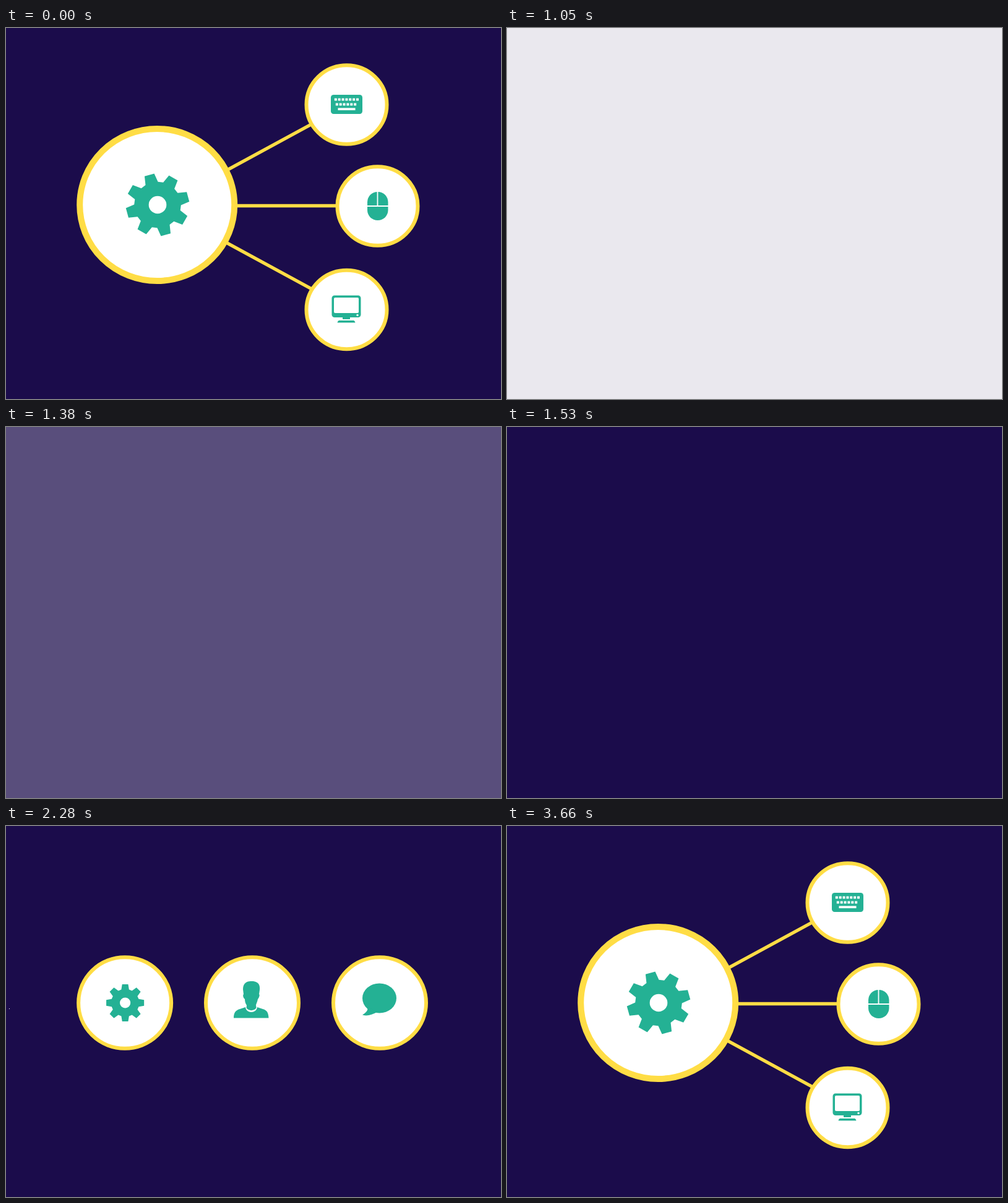
An HTML page for the animation above (3690 ms loop, 800x600 px).

```html
<!DOCTYPE html>
<html lang="en">
<head>
<meta charset="utf-8">
<title>Device menu</title>
<style>
  html, body { margin: 0; width: 100%; height: 100%; overflow: hidden; background: #1b0c4b; }
  svg { display: block; width: 100%; height: 100%; }
  .disc { fill: #fff; stroke: #ffdd45; }
  .icon { fill: #24b194; }
  .cut { fill: #fff; }
  .links line { stroke: #ffdd45; stroke-width: 5.4; }
</style>
</head>
<body>
<svg viewBox="0 0 800 600">
  <g id="trio">
    <rect x="5" y="295" width="1" height="1" fill="#fff"/>
    <g>
      <ellipse class="disc" cx="398" cy="286" rx="75" ry="73.8" stroke-width="6"/>
      <g class="icon">
        <path d="M383 264C383 254 389 251 397 251C406 251 411 255 410 265L409 272C411 274 408 279 407 280C406 285 404 288 404 290L404.5 294C402 299.500 391 299.500 388.500 294L389 290C387 287 386 284 386 280C384 279 382 274 384 272Z"/>
        <path d="M368 310.500C368 302 371 298 378 296L387 293C388 303.500 405 303.500 406 293L415 296C422 298 424 302 424.500 310.500Z"/>
      </g>
    </g>
    <g>
      <ellipse class="disc" cx="604" cy="286" rx="75" ry="73.8" stroke-width="6"/>
      <g class="icon">
        <ellipse cx="603.5" cy="278.500" rx="27.500" ry="24"/>
        <path d="M584 292C586 299 581 302 576 305.500C584 308 592 305 600 301Z"/>
      </g>
    </g>
  </g>

  <g class="links">
    <line x1="330" y1="244.700" x2="550" y2="125"/>
    <line x1="330" y1="287.500" x2="600" y2="287.500"/>
    <line x1="330" y1="332.800" x2="550" y2="452.500"/>
  </g>

  <g id="hub">
    <ellipse class="disc" cx="244.2" cy="286" rx="125" ry="123" stroke-width="10"/>
    <g transform="translate(245 286) scale(1.01 .995)">
      <path id="gear" class="icon"/>
      <circle class="cut" r="14.200"/>
    </g>
  </g>

  <g class="sat">
    <ellipse class="disc" cx="550.5" cy="124" rx="65" ry="63.700" stroke-width="6"/>
    <rect class="icon" x="525" y="108" width="51" height="31" rx="4.500"/>
    <g id="keys" class="cut"><rect x="536.5" y="129.300" width="28" height="3.700"/></g>
  </g>
  <g class="sat">
    <ellipse class="disc" cx="600.5" cy="288" rx="65" ry="63.700" stroke-width="6"/>
    <rect class="icon" x="584" y="265" width="33.500" height="46" rx="16.500"/>
    <path d="M583 288H618M600.500 264V288" stroke="#fff" stroke-width="1.800"/>
  </g>
  <g class="sat">
    <ellipse id="burst" class="disc" cx="550.5" cy="455.500" rx="65" ry="63.700" stroke-width="6"/>
    <g id="screen">
      <rect class="icon" x="526.5" y="432.500" width="47" height="35.500" rx="4.500"/>
      <rect class="cut" x="530" y="436" width="40" height="25" rx="2"/>
      <circle class="cut" cx="568" cy="464.300" r="1.600"/>
      <path class="icon" d="M544 467H556V471H544ZM538 473H562Q564 473.500 564.500 476.500H535.500Q536 473.500 538 473Z"/>
    </g>
    <ellipse id="touch" class="icon" cx="549.5" cy="456" rx="69.300" ry="68"/>
  </g>

  <rect id="flash" width="800" height="600" fill="#fff"/>
</svg>
<script>
const LOOP = 3690, STEP = 30;
const $ = id => document.getElementById(id);
const all = sel => [...document.querySelectorAll(sel)];
const phase = (t, start, len) => Math.min(1, Math.max(0, (t - start) / len));
const ease = x => x * x * (3 - 2 * x);
const show = (el, alpha) => {
  el.setAttribute('opacity', alpha);
  el.style.display = alpha > 0 ? '' : 'none';
};
const scaleAt = (el, x, y, s) =>
  el.setAttribute('transform', `translate(${x} ${y}) scale(${s}) translate(${-x} ${-y})`);

// Gear outline: one tooth turned eight times
const tooth = [[-10.3, -36], [-8, -50.4], [8, -50.4], [10.3, -36]];
const outline = [];
for (let i = 0; i < 8; i++) {
  const c = Math.cos(i * Math.PI / 4), s = Math.sin(i * Math.PI / 4);
  for (const [x, y] of tooth) outline.push([x * c - y * s, x * s + y * c].map(v => v.toFixed(2)));
}
$('gear').setAttribute('d', 'M' + outline.join('L') + 'Z');

const addKeys = (count, x, y) => {
  for (let i = 0; i < count; i++) {
    const key = $('keys').firstElementChild.cloneNode();
    const box = { x: x + i * 5.87, y, width: 4, height: 4 };
    for (const name in box) key.setAttribute(name, box[name]);
    $('keys').append(key);
  }
};
addKeys(7, 530.8, 113.6);
addKeys(6, 532.8, 121.5);

const links = all('.links line').map((el, i) => ({
  el, x: 330, y: +el.getAttribute('y1'), start: [2755, 2850, 2900][i]
}));
const sats = all('.sat').map((el, i) => {
  const disc = el.querySelector('.disc');
  return { el, x: +disc.getAttribute('cx'), y: +disc.getAttribute('cy'), start: [2858, 2930, 2985][i] };
});

function draw(t) {
  const late = t < 1000 ? t + LOOP : t;

  // Trio fades in, then the gear disc grows into the hub
  const fadeIn = ease(phase(late, 1560, 350));
  show($('trio'), fadeIn * (1 - ease(phase(late, 2690, 120))));
  show($('hub'), fadeIn);
  scaleAt($('hub'), 114, 286, 0.6 + 0.4 * ease(phase(late, 2685, 185)));
  const spin = 120 * (1 - (1 - phase(late, 2890, 950)) ** 4);
  $('gear').setAttribute('transform', `rotate(${spin})`);

  for (const { el, x, y, start } of links) {
    const s = ease(phase(late, start, 205));
    show(el, s > 0 ? 1 : 0);
    scaleAt(el, x, y, s);
  }
  for (const { el, x, y, start } of sats) {
    const s = ease(phase(late, start, 320));
    show(el, s > 0 ? 1 : 0);
    scaleAt(el, x, y, s);
  }

  // Monitor disc bursts over the stage
  const grow = t < 1000 ? phase(t, 405, 315) : 0;
  scaleAt($('burst'), 550.5, 455.5, 1 + 11.2 * grow ** 3.37);
  show($('screen'), 1 - grow ** 1.6);
  show($('touch'), 0.28 * Math.sin(Math.PI * Math.min(grow, 0.9999)) * (grow < 1 ? 1 : 0));

  show($('flash'), t >= 720 ? 1 - phase(t, 1002, 519) : 0);
}

function tick() {
  const t = performance.now() % LOOP;
  draw(Math.floor(t / STEP) * STEP);
  requestAnimationFrame(tick);
}
tick();
</script>
</body>
</html>
```
